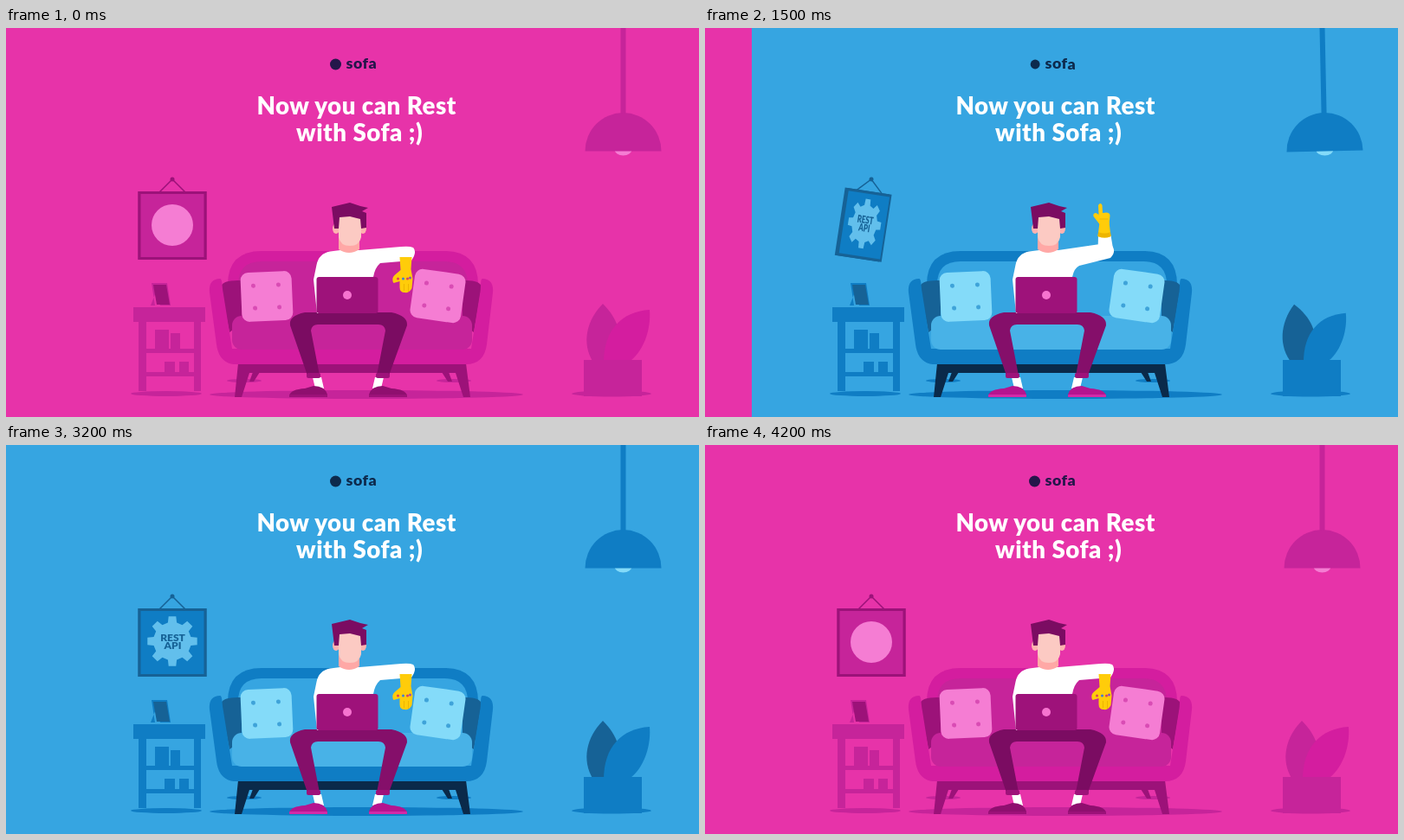
An HTML page that plays this animation: 800x450 px, repeating every 4.3 s.

```html
<!DOCTYPE html>
<html lang="en">
<head>
<meta charset="utf-8">
<title>Now you can Rest with Sofa</title>
<style>
html, body { margin: 0; width: 100%; height: 100%; overflow: hidden; background: #36a5e1; }
svg { display: block; width: 800px; height: 450px; }
text { font-family: Lato, "Open Sans", sans-serif; font-weight: 900; }
.title { letter-spacing: .5px; }
.pink {
  --bg: #e733a9; --mid: #c6249a; --dark: #9c1279; --soft: #f57dd3; --back: #d41d9f;
  --inner: #c6249a; --body: #d41d9f; --seat: #c6249a; --leg: #9c1279; --leafL: #c6249a;
  --leafR: #d41d9f; --ink: #25164a; --shoe: #8f0f6f; --sole: #9c1279; --pants: #7b0c62;
  --dot: #d94cb4;
}
.blue {
  --bg: #36a5e1; --mid: #0f7dc4; --dark: #166296; --soft: #84dbf9; --back: #0f7dc4;
  --inner: #36a5e1; --body: #0f7dc4; --seat: #48b2e7; --leg: #0a2a4a; --leafL: #166296;
  --leafR: #0f7dc4; --ink: #0d2a4d; --shoe: #b5148f; --sole: #d42aa8; --pants: #850f6a;
  --dot: #3fa3d9;
}
</style>
</head>
<body>
<svg id="stage" viewBox="0 0 800 450"></svg>
<script>
const LOOP = 4300;
const stage = document.getElementById('stage');

const path = (d, fill, extra = '') => `<path d="${d}" fill="${fill}" ${extra}/>`;
const rect = (x, y, w, h, fill, extra = '') =>
  `<rect x="${x}" y="${y}" width="${w}" height="${h}" fill="${fill}" ${extra}/>`;
const oval = (x, y, rx, ry, fill, extra = '') =>
  `<ellipse cx="${x}" cy="${y}" rx="${rx}" ry="${ry}" fill="${fill}" ${extra}/>`;
const v = name => `var(--${name})`;

function cushion(x, y, angle) {
  const dots = [[-15, -13], [14, -13], [-14, 13], [14, 13]];
  return `<g transform="translate(${x} ${y}) rotate(${angle})">` +
    rect(-29.5, -28.5, 59, 57, v('soft'), 'rx="9"') +
    dots.map(([a, b]) => oval(a, b, 2.5, 2.5, v('dot'))).join('') + '</g>';
}

function room() {
  const mid = v('mid'), dark = v('dark'), leg = v('leg');
  return rect(0, 0, 800, 450, v('bg')) +
    // side table
    oval(185, 423, 41, 3, mid) +
    rect(147, 323, 83, 17, mid) + rect(153, 340, 9, 80, mid) + rect(217, 340, 8, 80, mid) +
    rect(160, 371, 60, 5, mid) + rect(160, 398, 60, 5, mid) +
    rect(172, 349, 16, 22, mid) + rect(190, 353, 11, 18, mid) +
    rect(183, 386, 12, 12, mid) + rect(200, 386, 11, 12, mid) +
    path('M174 303L167 321H178ZM168 295H186L190 321H172Z', mid) +
    path('M170 297H185L189 320H174Z', dark) +
    // plant
    oval(699, 423, 46, 3.5, mid) +
    `<g class="leafL">${path('M678 387C664 365 670 338 689 319C706 336 713 354 706 387Z', v('leafL'))}</g>` +
    `<g class="leafR">${path('M690 387C690 350 710 328 743 326C745 350 735 376 718 387Z', v('leafR'))}</g>` +
    rect(667, 384, 67, 42, mid) +
    // lamp
    `<g class="lamp">` + oval(712.5, 141, 10, 6.5, v('soft')) + rect(709.5, -10, 6, 112, mid) +
    path('M668.5 142.5A44 44.5 0 0 1 756.5 142.5Z', mid) + '</g>' +
    // sofa
    oval(416, 424, 181, 5, mid) + oval(275, 408, 20, 2, mid) + oval(517, 408, 20, 2, mid) +
    path('M285 398H293L286 409H281ZM503 398H511L515 409H510Z', leg) +
    path('M268 388H531L536 427H528L519 399H281L272 427H264Z', leg) +
    path('M256 340V297Q256 258 295 258H506Q545 258 545 297V340Z', v('back')) +
    path('M268 340V297Q268 270 295 270H506Q533 270 533 297V340Z', v('inner')) +
    path('M248 300Q249 291 272 292V342L258 352ZM549 300Q548 291 527 292V342L540 352Z', dark) +
    path('M247 290C238 290 234 296 235 306L243 366Q246 389 266 389H531Q552 389 555 366L562 306' +
      'C563 296 559 290 550 290C547 290 549 300 547 308L537 371H261L251 308C249 298 250 290 247 290Z', v('body')) +
    rect(261, 333, 277, 39, v('seat'), 'rx="11"') +
    cushion(301, 310.5, -2.5) + cushion(498.5, 310, 8) +
    person() +
    // titles
    `<g class="mark">${oval(0, 0, 6.5, 6.5, v('ink'))}</g>` +
    `<text class="logo title" x="392.5" y="47" font-size="17.8" fill="${v('ink')}">sofa</text>` +
    `<g class="title" font-size="27.7" fill="#fff" text-anchor="middle">` +
    `<text x="404.7" y="99.5">Now you can Rest</text><text x="408.2" y="131">with Sofa ;)</text></g>`;
}

function person() {
  const shoe = 'M327 425Q329 418 345 417L355 414Q368 414 371 424V427H327Z';
  const foot = path('M354 404H364L367 417H357Z', '#fff') + path(shoe, v('shoe')) +
    rect(327, 424, 44, 3, v('sole'), 'rx="1"') + rect(347, 399, 16, 6, '#9e127a', 'rx="2"');
  return path('M345 329Q326 333 328 344L348 402H362L352 350Q353 343 360 343H430Q437 343 438 350' +
      'L428 402H442L463 344Q464 333 445 329Z', v('pants')) +
    foot + `<g transform="translate(790 0) scale(-1 1)">${foot}</g>` +
    path('', '#fff', 'class="torso"') +
    `<g class="head">` + path('M384 240H408V256Q396 264 384 256Z', '#ffa8a6') +
    oval(381, 232, 4, 6, '#ffb3b0') + oval(412, 232, 4, 6, '#ffb3b0') +
    path('M384 216H410V242Q408 252 397 252Q386 252 384 242Z', '#fccac3') +
    path('M376 207L397 202L409 206L418 208L411 212L416 214V231L410 232L409 221L397 218L385 219L384 232H379Z',
      '#7b0c62') + '</g>' +
    rect(358.5, 288, 71, 42, '#9e127a', 'rx="3"') + oval(394, 309, 5, 5, '#f673cf') +
    `<g class="arm">` + path('', '#fff', 'class="sleeve"') +
    `<g class="hand">${hands()}</g></g>`;
}

function hands() {
  const gold = '#ffcc0a', shade = '#edb500';
  const cuff = path('M-8 1Q0 4 7 1L5 -15H-6Z', gold) + path('M-8 1Q0 4 7 1L6.5 -4Q0 -1 -7.5 -4Z', shade);
  const gems = [[9, -24, '#e0405a'], [3, -24, '#3d7dd8'], [-2, -24, '#e0405a'], [-5, -23, '#8b4fc0']];
  return `<g class="rest">` +
    path('M-7 1L-6 -13L-8 -24L-7 -35Q-4 -41 1 -40Q7 -40 7 -34L7 -27L14 -29Q17 -24 13 -20L6 -14L7 1Z', gold) +
    path('M2 -30V-38M-3 -30V-39', 'none', `stroke="${shade}"`) +
    gems.map(([x, y, c]) => oval(x, y, 1.5, 1.5, c)).join('') + '</g>' +
    `<g class="open">` + cuff + path('M-6 -13L-9 -25L6 -26L5 -13Z', gold) +
    path('M-5 -18L-13 -27M-6 -24L-10 -37M-3 -24L-4 -39M1 -24L2 -38M4 -23L6 -33', 'none',
      `stroke="${gold}" stroke-width="4" stroke-linecap="round"`) + '</g>' +
    `<g class="point">` + cuff +
    path('M-6 -13L-13 -22Q-14 -26 -10 -26L-7 -24L-7.5 -35Q-5 -39 -3 -35L-2.5 -26Q6 -28 6 -23L5 -13Z', gold) +
    path('M-6 -19H4', 'none', `stroke="${shade}"`) + '</g>';
}

function gear(cx, cy, teeth, inner, outer) {
  const pts = [];
  for (let i = 0; i < teeth; i++)
    for (const [off, r] of [[-.30, inner], [-.19, outer], [.19, outer], [.30, inner]]) {
      const a = (i + off) * 2 * Math.PI / teeth;
      pts.push((cx + r * Math.sin(a)).toFixed(1) + ' ' + (cy - r * Math.cos(a)).toFixed(1));
    }
  return `M${pts.join('L')}Z`;
}

const poster = `<g id="poster" class="pink"><g id="tilt">` +
  path('M177 190L192 175L207 190', 'none', `stroke="${v('dark')}" stroke-width="1.5"`) +
  oval(192, 175, 2.5, 2.5, v('dark')) + `<g id="flip">` +
  rect(152.5, 189, 79, 79, v('dark'), 'id="edge"') + rect(152.5, 189, 79, 79, v('dark')) +
  rect(155.5, 192, 73, 73, v('mid')) +
  `<g id="badge">${oval(192, 228, 24, 24, '#f57dd3')}</g>` +
  `<g id="rest">` + path(gear(192, 227, 8, 22, 29), '#62bfec') +
  `<g font-size="12" fill="${v('dark')}" text-anchor="middle">` +
  `<text x="192.5" y="226.5">REST</text><text x="192.5" y="236">API</text></g></g></g></g></g>`;

stage.innerHTML = `<clipPath id="wipe"><rect id="wipeBox" width="800" height="450"/></clipPath>` +
  `<g class="blue">${room()}</g><g class="pink" clip-path="url(#wipe)">${room()}</g>` + poster;

const byId = id => document.getElementById(id);
const set = (sel, name, value) => stage.querySelectorAll(sel).forEach(n => n.setAttribute(name, value));
const show = (sel, on) => set(sel, 'visibility', on ? 'visible' : 'hidden');
const ease = (t, start, len) => {
  const u = Math.min(1, Math.max(0, (t - start) / len));
  return u * u * (3 - 2 * u);
};
// damped swing that starts at `start` and has died out after `len`
const swing = (t, start, decay, period, len) => {
  const s = t - start;
  return s <= 0 || s >= len ? 0 : Math.exp(-s / decay) * Math.sin(2 * Math.PI * s / period) * (1 - s / len);
};

function draw(t) {
  const edge = 800 * (1 - ease(t, 1060, 523) + ease(t, 3255, 421));
  byId('wipeBox').setAttribute('width', edge);

  const sway = swing(t, 3590, 400, 800, 600) - swing(t, 1200, 400, 800, 600);
  set('.lamp', 'transform', `rotate(${7.2 * sway} 712 0)`);
  set('.leafL', 'transform', `rotate(${45 * sway} 690 387)`);
  set('.leafR', 'transform', `translate(705 387) rotate(${4 * sway}) scale(${1 - .4 * Math.abs(sway)}) translate(-705 -387)`);

  const hop = swing(t, 1322, 300, 520, 600) + swing(t, 3467, 300, 520, 600);
  const late = swing(t, 1350, 300, 520, 600) + swing(t, 3495, 300, 520, 600);
  set('.logo', 'dy', `0 0 ${.5 * hop} ${1.5 * late}`);
  set('.mark', 'transform', `translate(${380.5 + 2 * hop} 42) scale(${1 - .5 * Math.abs(hop)})`);

  // picture on the wall flips as the wipe passes
  const blue = t > 1400 && t < 3365;
  const tilt = swing(t, 1400, 300, 600, 800) + swing(t, 3365, 300, 600, 800);
  const turn = swing(t, 1400, 300, 400, 800) + swing(t, 3365, 300, 400, 800);
  const phi = 78 * turn * Math.PI / 180;
  byId('poster').setAttribute('class', blue ? 'blue' : 'pink');
  byId('tilt').setAttribute('transform', `rotate(${16 * tilt} 192 175)`);
  byId('flip').setAttribute('transform', `translate(192 0) scale(${Math.cos(phi)} 1) translate(-192 0)`);
  byId('edge').setAttribute('x', 152.5 - 9 * Math.sin(phi) ** 3);
  show('#badge', !blue);
  show('#rest', blue);

  // arm and head
  const up = ease(t, 450, 300) - ease(t, 2900, 250);
  const len = 4 + 14 * up;
  set('.torso', 'd', `M386 257L374 258.5Q361 261 358.5 274L355 291L359 330H425L424 288` +
    `Q426 ${277 + up} 432 ${272 + 3 * up}L468 ${269 - 3 * up}Q475 259 470 ${254 - 2 * up}` +
    `Q466 ${252 - up} 456 ${253 - 3 * up}L408 257Z`);
  set('.arm', 'transform', `translate(461.5 ${262 - 4 * up}) rotate(${180 * (1 - up)})`);
  set('.sleeve', 'd', `M-8 2L-7.5 ${-len}H7L10 0Q9 6 0 7Z`);
  set('.hand', 'transform', `translate(0 ${-len})`);
  show('.rest', up < .5);
  show('.open', up >= .5 && t < 1050);
  show('.point', up >= .5 && t >= 1050);
  const lean = ease(t, 500, 250) - ease(t, 900, 250);
  set('.head', 'transform', `rotate(${-6 * lean} 397 258)`);
}

const begin = performance.now();
function tick() {
  const t = (performance.now() - begin) % LOOP;
  draw(Math.floor((t + 5) / 100) * 100 % LOOP); // ten poses a second
  requestAnimationFrame(tick);
}
tick();
</script>
</body>
</html>
```
